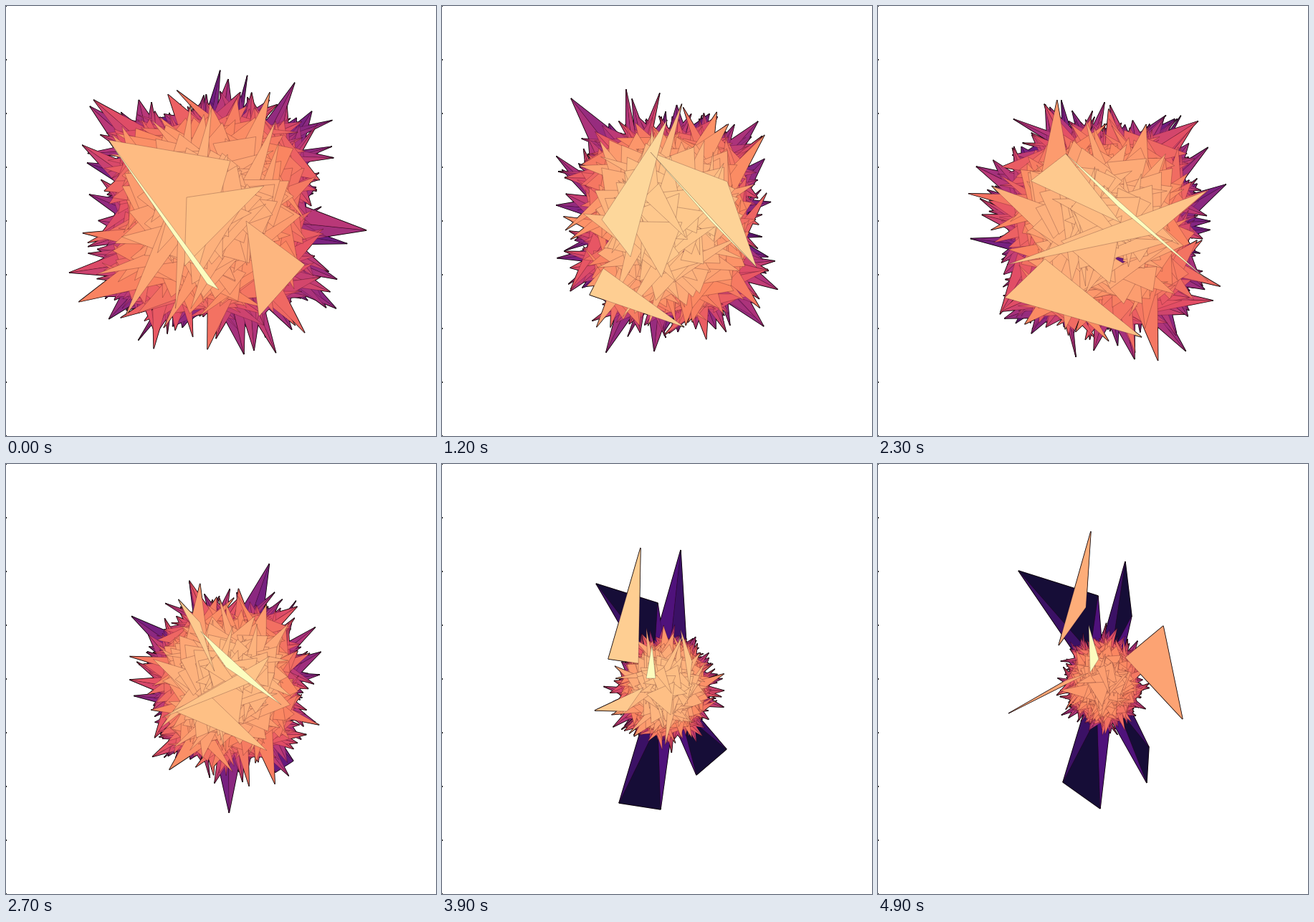
Animation, 600 px wide and 600 px high, one loop 5.5 s. Source, as an HTML page with a canvas:

```html
<!DOCTYPE html>
<html>
<head>
<meta charset="utf-8">
<style>
html, body { margin: 0; height: 100%; overflow: hidden; background: #fff; }
canvas { display: block; }
</style>
</head>
<body>
<canvas id="c" width="600" height="600"></canvas>
<script>
const ctx = document.getElementById('c').getContext('2d');
const STEP = 100, LAST = 49, LOOP = 5500;

const mix = (a, b, k) => Array.isArray(a) ? a.map((v, i) => mix(v, b[i], k)) : a + (b - a) * k;

// Depth 0..1 sets both the colour and the painting order.
const magma = '#000004 #1c1044 #4f127b #812581 #b5367a #e55064 #fb8761 #fec287 #fcfdbf'.split(' ')
  .map(h => [1, 3, 5].map(i => parseInt(h.substr(i, 2), 16)));

function colour(t) {
  const p = Math.max(0, Math.min(.999, t)) * 8, i = Math.floor(p);
  return `rgb(${mix(magma[i], magma[i + 1], p - i).map(Math.round)})`;
}

// ball: centre, radii, front depth;  horns: one or two tip points;  plates: triangles
const keys = [];
function key(step, ball, horns, plates) {
  keys.push({ step, data: [ball, horns.map(h => [...h, ...h].slice(0, 4)), plates] });
}

key(0, [285, 290, 148, 152, .84],
  [[310, 102], [332, 486], [117, 140], [503, 313]],
  [[143, 187, 297, 396, 281, 388], [252, 267, 360, 251, 249, 363],
   [143, 187, 313, 216, 268, 368], [335, 300, 417, 361, 353, 433]]);
key(5, [290, 302, 145, 152, .9],
  [[466, 125], [151, 489], [107, 239], [479, 378]],
  [[185, 352, 488, 227, 304, 395], [172, 305, 289, 214, 326, 231],
   [189, 428, 198, 378, 405, 406], [290, 350, 415, 345, 461, 429]]);
key(12, [315, 302, 125, 142, .89],
  [[441, 161], [296, 482], [180, 129], [449, 447]],
  [[291, 204, 439, 365, 375, 300], [314, 159, 223, 298, 263, 350],
   [291, 204, 398, 245, 439, 365], [206, 403, 225, 366, 338, 448]]);
key(23, [310, 310, 135, 142, .86],
  [[399, 156], [358, 493], [137, 224], [416, 460]],
  [[262, 206, 461, 384, 335, 280], [213, 244, 262, 206, 338, 302],
   [459, 258, 388, 318, 180, 361], [177, 407, 233, 353, 368, 462]]);
key(32, [308, 303, 68, 72, .86],
  [[328, 118], [253, 479], [223, 198], [382, 357, 326, 393]],
  [[284, 268, 288, 276, 272, 288], [275, 120, 282, 240, 232, 273],
   [253, 282, 298, 283, 266, 345], [303, 265, 345, 282, 359, 322]]);
key(39, [312, 312, 65, 72, .87],
  [[333, 120], [247, 473, 305, 482], [215, 167, 301, 194], [397, 398, 355, 434]],
  [[293, 252, 298, 299, 285, 299], [277, 117, 274, 278, 232, 272],
   [213, 344, 281, 312, 258, 345], [333, 231, 349, 275, 345, 310]]);
key(49, [315, 305, 52, 62, .8],
  [[345, 136, 354, 212], [258, 444, 310, 481], [196, 149, 307, 184], [378, 395, 375, 445]],
  [[294, 225, 308, 272, 296, 291], [297, 94, 290, 200, 252, 253],
   [182, 348, 262, 302, 293, 292], [398, 226, 425, 356, 345, 270]]);

let seed = 11;
function rnd() {
  seed = (seed * 16807) % 2147483647;
  return seed / 2147483647;
}
const COUNT = 440;
const shards = Array.from({ length: COUNT }, (_, i) =>
  ({ u: i / COUNT, a: rnd() * 2 * Math.PI, turn: rnd() - .5, len: rnd(), w: rnd(), phase: rnd() * 6.3 }));

function pose(step) {
  let i = 0;
  while (i < keys.length - 2 && step >= keys[i + 1].step) i++;
  const a = keys[i], b = keys[i + 1];
  return mix(a.data, b.data, (step - a.step) / (b.step - a.step));
}

function facets(step) {
  const [[cx, cy, rx, ry, hi], horns, plates] = pose(step);
  const out = [], add = (t, ...pts) => out.push({ t, pts });
  const big = Math.max(0, Math.min(1, (rx - 68) / 65));
  const lo = .45 - .13 * big;
  const bulge = a => 1 + big * ((Math.cos(a) ** 4 + Math.sin(a) ** 4) ** -.25 - 1);
  const at = (x, y) => [cx + x * rx, cy + y * ry];

  add(lo, ...Array.from({ length: 40 }, (_, i) => {
    const a = i * Math.PI / 20, r = .9 * bulge(a);
    return at(r * Math.cos(a), r * Math.sin(a));
  }));

  for (const { u, a: a0, turn, len: l, w: w0, phase } of shards) {
    const a = a0 + .25 * Math.sin(step * .12 + phase);
    const r = .9 * Math.sqrt(1 - u * u) * bulge(a), size = 1 + 1.2 * u * u;
    const d = a + turn * (.5 + 5 * u), dx = Math.cos(d), dy = Math.sin(d);
    const len = size * (.1 + .24 * l * l) * (1 + .4 * Math.sin(step * .2 + phase * 2));
    const w = size * (.04 + .11 * w0);
    const x = r * Math.cos(a), y = r * Math.sin(a);
    const bx = x - dx * .15 * size, by = y - dy * .15 * size;
    const tip = at(x + dx * len, y + dy * len), mid = at(bx, by);
    const left = at(bx - dy * w, by + dx * w), right = at(bx + dy * w, by - dx * w);
    const t = lo + (hi - lo) * u ** .6;
    if (u < .4) {
      add(t, tip, left, mid);
      add(t - .04, tip, mid, right);
    } else add(t, tip, left, right);
  }

  // Horns are wedges that rise from the ball and end in a point or an edge.
  const shade = mix(.2, .46, big), root = mix(.3, .55, big);
  for (const [x1, y1, x2, y2] of horns) {
    const dx = (x1 + x2) / 2 - cx, dy = (y1 + y2) / 2 - cy;
    const mid = [cx + dx * root, cy + dy * root], w = .12;
    let sides = [[mid[0] - dy * w, mid[1] + dx * w], [mid[0] + dy * w, mid[1] - dx * w]];
    if ((x1 - x2) * -dy + (y1 - y2) * dx < 0) sides = sides.reverse();
    add(shade, [x1, y1], sides[0], mid);
    add(shade + .05, [x2, y2], mid, sides[1]);
    add(shade - .1 * (1 - big), [x1, y1], [x2, y2], mid);
  }

  const depth = [1, hi + .03, hi + .02, hi + .01];
  plates.forEach((p, i) => add(depth[i], ...[0, 2, 4].map(j => p.slice(j, j + 2))));
  return out.sort((a, b) => a.t - b.t);
}

function trace(pts) {
  ctx.beginPath();
  pts.forEach(p => ctx.lineTo(...p));
  ctx.closePath();
}

function draw(step) {
  ctx.fillStyle = '#fff';
  ctx.fillRect(0, 0, 600, 600);
  ctx.fillStyle = '#000';
  for (let y = 0; y <= 600; y += 75) ctx.fillRect(0, y - 1, 1, 2);

  const list = facets(step);
  ctx.lineJoin = 'bevel';
  ctx.strokeStyle = '#000';
  ctx.lineWidth = 1.4;
  for (const f of list) {
    trace(f.pts);
    ctx.stroke();
  }
  ctx.strokeStyle = 'rgba(40,0,20,.4)';
  ctx.lineWidth = .6;
  for (const f of list) {
    trace(f.pts);
    ctx.fillStyle = colour(f.t);
    ctx.fill();
    ctx.stroke();
  }
}

let shown = -1;
function tick() {
  const step = Math.min(LAST, Math.floor(performance.now() % LOOP / STEP));
  if (step !== shown) draw(shown = step);
  requestAnimationFrame(tick);
}
tick();
</script>
</body>
</html>
```
